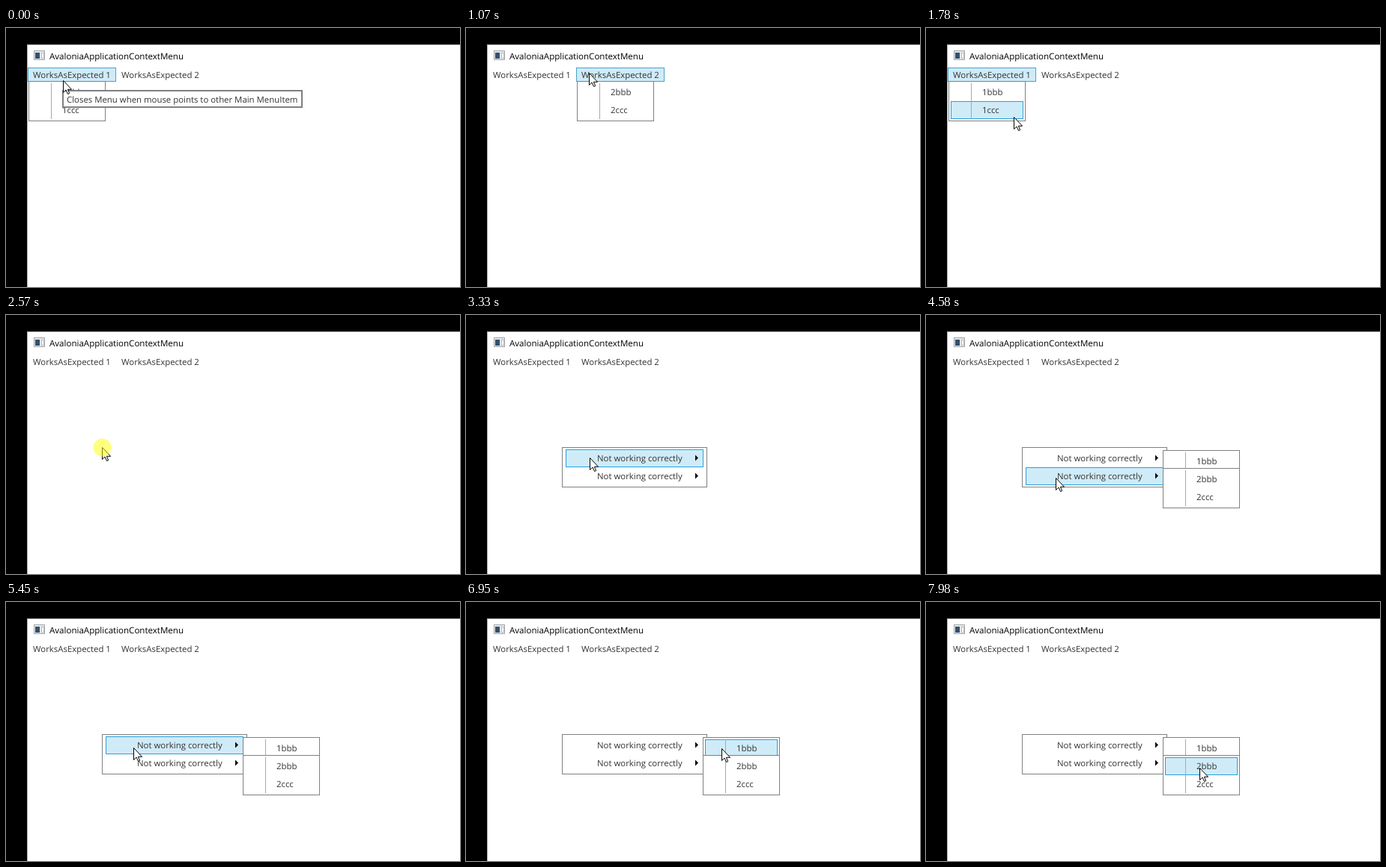
Animation, 606 px wide and 347 px high, one loop 8000 ms. Source, as an HTML page with a canvas:

```html
<!DOCTYPE html>
<html lang="en">
<head>
<meta charset="utf-8">
<title>Context menu demo</title>
<style>
  html, body { margin: 0; width: 100%; height: 100%; overflow: hidden; background: #000; }
  canvas { display: block; }
</style>
</head>
<body>
<canvas id="stage" width="606" height="347"></canvas>
<script>
const stage = document.getElementById('stage');
const ctx = stage.getContext('2d');
const LOOP = 8000;
const UPDATE = 63; // ms between pointer updates
const ROW = 24;    // height of a menu item
const TAB = 118;   // width of a header item
const BORDER = '#808080', ACCENT = '#26a0da', HOVER = '#d0ebf8', INK = '#333';
const ARROW = new Path2D('M.5 .5V16.5L4 13l2.6 5.5 2.1-.9-2.3-5.3h5.2z');
const TRIANGLE = new Path2D('M0 0l4 4-4 4z');

// Where the pointer heads, and when it sets off
const TARGETS = [
  { at: 320, x: 190, y: 60 },
  { at: 1070, x: 106, y: 60 },
  { at: 1710, x: 128, y: 177 },
  { at: 3140, x: 165, y: 191 },
  { at: 3650, x: 168, y: 191 },
  { at: 4080, x: 173, y: 218 },
  { at: 5270, x: 170, y: 195 },
  { at: 6690, x: 360, y: 196 },
  { at: 7310, x: 366, y: 210 },
  { at: 7800, x: 365, y: 222 }
];

// Each move eases out in discrete updates; longer moves take more of them
function pointerAt(t) {
  let x = 76, y = 70;
  for (const target of TARGETS) {
    if (t < target.at) break;
    const dx = target.x - x, dy = target.y - y;
    const updates = Math.floor(1 + Math.sqrt(Math.hypot(dx, dy)) / 2);
    const done = Math.min(updates, 1 + Math.floor((t - target.at) / UPDATE));
    const ease = Math.sin(done / updates * Math.PI / 2);
    x += dx * ease;
    y += dy * ease;
  }
  return [Math.round(x), Math.round(y)];
}

function fill(color, x, y, w, h) {
  ctx.fillStyle = color;
  ctx.fillRect(x, y, w, h);
}

function box(x, y, w, h, background = '#fff', border = BORDER, line = 1) {
  fill(border, x, y, w, h);
  fill(background, x + line, y + line, w - 2 * line, h - 2 * line);
}

function text(str, x, y, color = INK, size = 11.4) {
  ctx.font = size + 'px "Open Sans", "Noto Sans", sans-serif';
  ctx.fillStyle = color;
  ctx.fillText(str, x, y);
}

function shape(path, x, y, color, outline) {
  ctx.save();
  ctx.translate(x, y);
  ctx.fillStyle = color;
  ctx.fill(path);
  if (outline) {
    ctx.strokeStyle = outline;
    ctx.stroke(path);
  }
  ctx.restore();
}

function drawWindow() {
  fill('#000', 0, 0, stage.width, stage.height);
  fill('#b0b0b0', 28, 22, stage.width, stage.height);
  fill('#fff', 29, 23, stage.width, stage.height);
  box(37, 30, 15, 13, '#e4e6e8', '#a4a8ac');
  fill('#34506e', 39, 33, 6, 8);
  box(47, 33, 4, 8, '#fff', '#b5bdc5');
  text('AvaloniaApplicationContextMenu', 58, 42, '#000', 11.56);
}

function drawHeader(index, active) {
  const x = 29 + TAB * index;
  if (active) box(x, 53, TAB, 19, HOVER, '#4aa3c8');
  text('WorksAsExpected ' + (index + 1), x + 7, 67);
}

function drawSubmenu(x, y, number, hovered = -1) {
  box(x, y, 103, 54);
  if (hovered >= 0) box(x + 3, y + 3 + ROW * hovered, 97, ROW, HOVER, ACCENT);
  fill('#a9a9a9', x + 30, y + 3, 1, 2 * ROW);
  ['bbb', 'ccc'].forEach((name, i) => text(number + name, x + 45, y + 19 + ROW * i));
}

function drawContextMenu(lit) {
  box(128, 177, 194, 54);
  lit.forEach((on, i) => {
    const y = 180 + ROW * i;
    if (on) box(133, y, 184, ROW, HOVER, ACCENT);
    text('Not working correctly', 175, y + 16);
    shape(TRIANGLE, 306, y + 7.5, '#000');
  });
}

function drawClick(x, y) {
  ctx.fillStyle = 'rgba(255, 255, 0, .5)';
  ctx.beginPath();
  ctx.arc(x + .5, y + .5, 12, 0, 2 * Math.PI);
  ctx.fill();
}

function draw(t) {
  const [x, y] = pointerAt(t);
  const between = (from, to) => t >= from && t < to;
  drawWindow();

  const open = t >= 2140 ? -1 : x < 29 + TAB ? 0 : 1;
  drawHeader(0, open === 0);
  drawHeader(1, open === 1);
  if (open >= 0) {
    const row = Math.floor((y - 74) / ROW);
    drawSubmenu(30 + TAB * open, 71, open + 1, row < 2 ? row : -1);
  }
  if (open === 0 && t < 640) {
    box(75, 83, 321, 24, '#fff', BORDER, 2);
    text('Closes Menu when mouse points to other Main MenuItem', 81, 100);
  }

  if (t >= 2700) {
    const inSubmenu = x > 317;
    // The first item stays lit until the second submenu opens
    const firstLit = t < 4580 ? y >= 180 : y < 204 && !inSubmenu;
    drawContextMenu([firstLit, y >= 204 && !inSubmenu]);
    if (t >= 3650) drawSubmenu(316, 181, 1, inSubmenu && y < 205 ? 0 : -1);
    if (t >= 4580) drawSubmenu(316, 205, 2, inSubmenu && y >= 205 ? 0 : -1);
  }

  shape(ARROW, x, y, '#fff', '#000');
  if (between(2140, 2210) || between(2570, 2700)) drawClick(x, y);
}

ctx.textRendering = 'geometricPrecision';
const began = performance.now();
function tick() {
  draw((performance.now() - began) % LOOP);
  requestAnimationFrame(tick);
}
tick();
</script>
</body>
</html>
```
